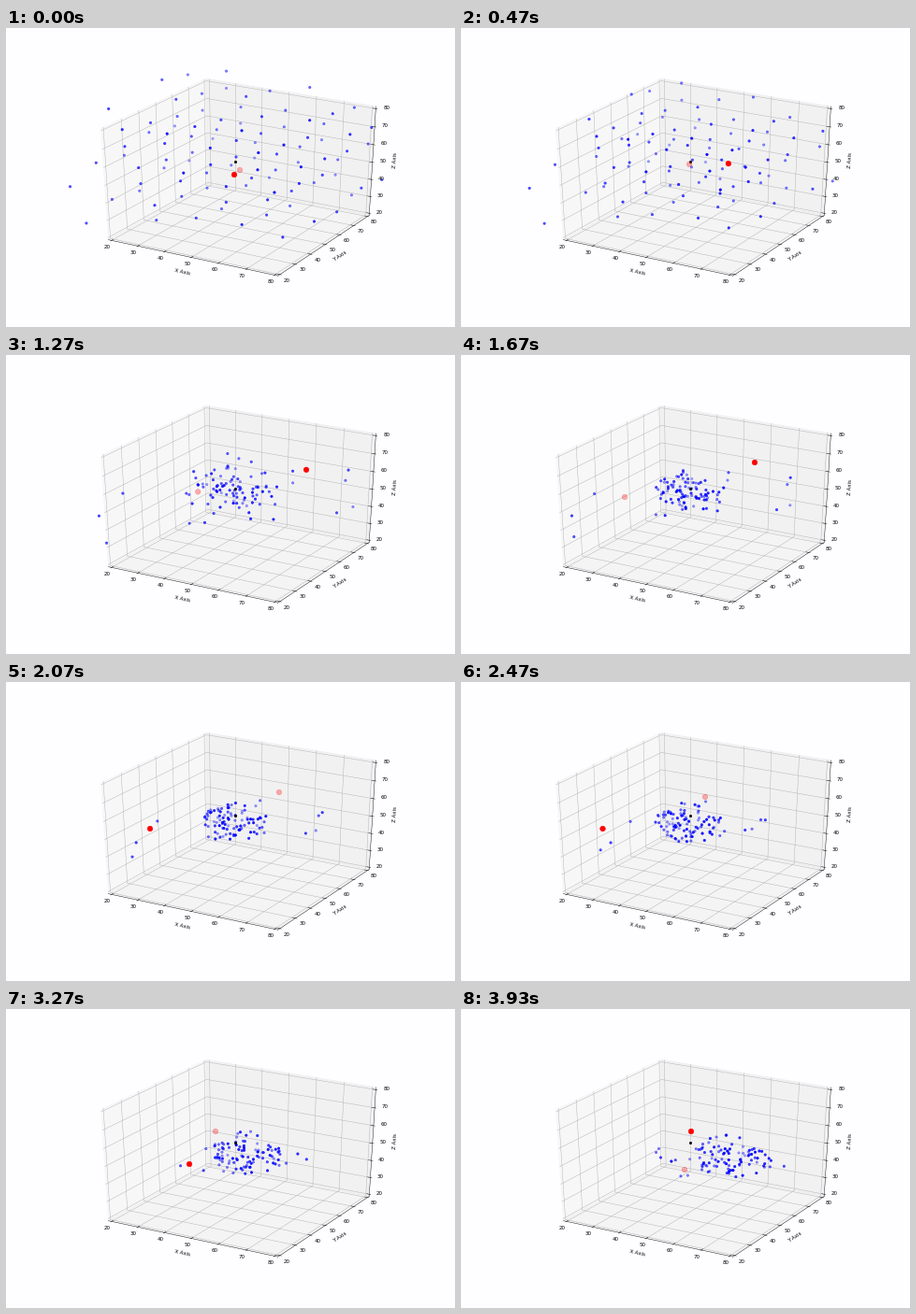
A matplotlib script for the animation above (3.99 s loop, 480x320 px).

```python
import numpy as np
import matplotlib.pyplot as plt
from matplotlib.animation import FuncAnimation
from matplotlib.patches import Polygon, Rectangle

W, H, DPI = 480, 320, 40
FRAMES, LOOP = 60, 3990
BOX = (60, 38.4, 372, 241.6)          # plot area: left, top, width, height
EDGE = 0.5 + 1 / 48                   # half side of the drawn cube
CAM = 10                              # camera distance

# Perspective camera, azimuth -60 and elevation 30 degrees
AZ, EL = np.radians(-60), np.radians(30)
VIEW = np.array([
    [-np.sin(AZ), np.cos(AZ), 0],
    [-np.sin(EL) * np.cos(AZ), -np.sin(EL) * np.sin(AZ), np.cos(EL)],
    [np.cos(EL) * np.cos(AZ), np.cos(EL) * np.sin(AZ), np.sin(EL)],
])
ORIGIN = np.array([BOX[0] + BOX[2] * 0.095 / 0.185, BOX[1] + BOX[3] * 0.09 / 0.185])
SCALE = np.array([BOX[2], -BOX[3]]) / 1.85


def project(points):
    """Screen position and depth (towards the viewer) of cube points."""
    v = np.asarray(points, float) @ VIEW.T
    depth = v[..., 2]
    return ORIGIN + SCALE * v[..., :2] * (CAM / (CAM - depth))[..., None], depth


def spline(keys, points):
    """Smooth path through the key points, one row per frame."""
    keys, p = np.array(keys, float), np.array(points, float)
    m = np.gradient(p, keys, axis=0)
    t = np.arange(FRAMES)
    k = np.clip(np.searchsorted(keys, t, "right") - 1, 0, len(keys) - 2)
    h = (keys[k + 1] - keys[k])[:, None]
    s = (t - keys[k])[:, None] / h
    return ((1 + 2 * s) * (1 - s) ** 2 * p[k] + s * (1 - s) ** 2 * h * m[k]
            + s * s * (3 - 2 * s) * p[k + 1] + s * s * (s - 1) * h * m[k + 1])


fig = plt.figure(figsize=(W / DPI, H / DPI), dpi=DPI, facecolor="#fefdff")
ax = fig.add_axes([0, 0, 1, 1])
ax.set(xlim=(0, W), ylim=(H, 0))
ax.axis("off")


def line(points, color, lw, z):
    xy, _ = project(points)
    ax.plot(xy[:, 0], xy[:, 1], color=color, lw=lw, zorder=z)


def label(point, text, angle=0):
    (x, y), _ = project(point)
    ax.text(x, y, text, size=10, family="DejaVu Sans", rotation=angle,
            rotation_mode="anchor", ha="center", va="center")


def draw_cube():
    e = EDGE
    panes = [
        (0.95, [(-e, -e, -e), (-e, e, -e), (-e, e, e), (-e, -e, e)]),
        (0.90, [(-e, e, -e), (e, e, -e), (e, e, e), (-e, e, e)]),
        (0.925, [(-e, -e, -e), (e, -e, -e), (e, e, -e), (-e, e, -e)]),
    ]
    for gray, corners in panes:
        color = (gray, gray, gray, 0.5)
        ax.add_patch(Polygon(project(corners)[0], fc=color, ec=color, lw=1, zorder=0))

    # Label distances follow from the paddings in points
    unit = 48 / (72 * (BOX[2] + BOX[3]) / DPI) / 12
    far, near, pad = e + 1 / 120, e - 1 / 60, e + 11.5 * unit
    for value in range(20, 81, 10):
        t = (value - 50) / 60
        for path in ([(t, -e, -e), (t, e, -e), (t, e, e)],
                     [(e, t, -e), (-e, t, -e), (-e, t, e)],
                     [(-e, -e, t), (-e, e, t), (e, e, t)]):
            line(path, "#b0b0b0", 0.8, 1)
        for tick in ([(t, -far, -e), (t, -near, -e)],
                     [(far, t, -e), (near, t, -e)],
                     [(far, e, t), (near, e, t)]):
            line(tick, "black", 0.8, 2)
        for spot in ((t, -pad, -pad), (pad, t, -pad), (pad, pad, t)):
            label(spot, str(value))

    pad = e + 25 * unit
    for name, a, b, spot in (
            ("X", (-e, -e, -e), (e, -e, -e), (0, -pad, -pad)),
            ("Y", (e, -e, -e), (e, e, -e), (pad, 0, -pad)),
            ("Z", (e, e, -e), (e, e, e), (pad, pad, 0))):
        line([a, b], "black", 0.75, 2)
        dx, dy = project(b)[0] - project(a)[0]
        label(spot, name + " Axis", np.degrees(np.arctan2(-dy, dx)))


# Flock: evenly scattered at first, gathers in a ball, then drifts off with laggards
N = 100
rng = np.random.default_rng(7)
steps = 1.2207441 ** -np.arange(1, 4)   # low-discrepancy sequence in 3D
start = ((0.5 + np.outer(np.arange(N), steps)) % 1 * 2 - 1) * (0.66, 0.66, 0.5)
ball = rng.normal(size=(N, 3))
ball *= 0.22 * np.cbrt(rng.random((N, 1))) / np.linalg.norm(ball, axis=1, keepdims=True)
spin = rng.normal(0.015, 0.012, N)
follow = np.where(rng.random(N) < 0.13, rng.uniform(-0.5, 0.5, N), rng.uniform(0.88, 1.1, N))

# The outermost boids to the sides arrive much later than the rest
tau = rng.uniform(15, 21, N)
tau[np.argsort(abs(start @ VIEW[0]))[-7:]] = 42


def flock(n):
    g = np.exp(-(n / tau) ** 2)[:, None]
    c, s = np.cos(spin * n), np.sin(spin * n)
    x, y, z = ball.T
    turned = np.stack([c * x - s * y, s * x + c * y, z], axis=1)
    xy, depth = project(start * g + turned * (1 - g))
    xy += np.array([246, 138 + 20 * n / FRAMES]) - ORIGIN
    xy[:, 0] += follow * 46 * (max(n - 36, 0) / 23) ** 2
    return xy, depth


keys = (0, 13, 25, 31, 43, 49, 59)
hunters = np.stack([
    spline(keys, [(244, 157), (313, 135), (314, 115), (292, 118),
                  (234, 128), (224, 131), (246, 131)]),
    spline(keys, [(250, 152), (233, 143), (175, 152), (154, 157),
                  (166, 158), (196, 166), (239, 172)]),
], axis=1)


def dots(color, size, z):
    group = ax.scatter([], [], s=size, c=color, linewidths=1, zorder=z)
    group.set_clip_path(Rectangle(BOX[:2], BOX[2], BOX[3], transform=ax.transData))
    return group


def shade(group, xy, depth, rgb):
    """Place dots far to near, fading with distance."""
    order = np.argsort(depth)
    near = (depth - depth.min()) / np.ptp(depth)
    colors = np.column_stack([np.tile(rgb, (len(depth), 1)), 0.3 + 0.7 * near])[order]
    group.set_offsets(xy[order])
    group.set_facecolor(colors)
    group.set_edgecolor(colors)


draw_cube()
boids = dots("blue", 20, 3)
goal = dots("black", 20, 4)
goal.set_offsets([(244.5, 142.8)])
reds = dots("red", 100, 5)


def update(n):
    shade(boids, *flock(n), (0, 0, 1))
    first_near = n < 28 or n >= 54
    shade(reds, hunters[n], np.array([1.0, 0.0] if first_near else [0.0, 1.0]), (1, 0, 0))
    return boids, reds


anim = FuncAnimation(fig, update, frames=FRAMES, interval=LOOP / FRAMES,
                     init_func=lambda: update(0), repeat=True, repeat_delay=0)
plt.show()
```
